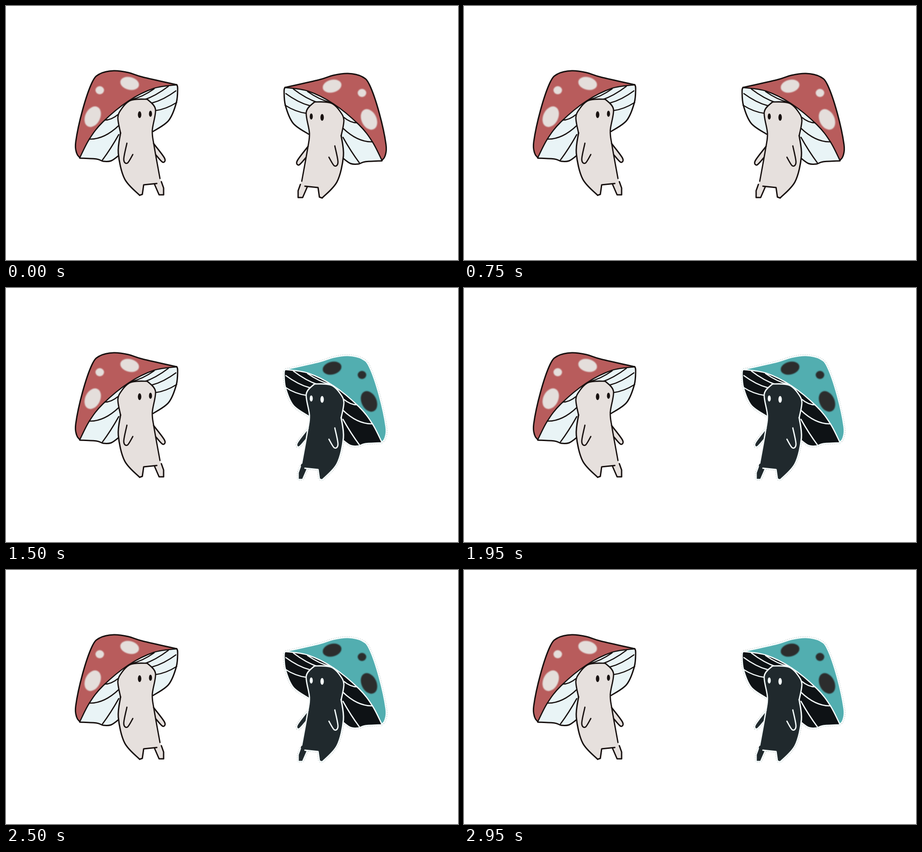
Write an HTML page with a canvas that moves like this. It is 998x561 px and loops after 3250 ms.

```html
<!DOCTYPE html>
<html lang="en">
<head>
<meta charset="utf-8">
<title>Two mushrooms</title>
<style>
html, body { margin: 0; width: 100%; height: 100%; overflow: hidden; background: #fff; }
canvas { display: block; }
</style>
</head>
<body>
<canvas id="stage" width="998" height="561"></canvas>
<script>
const ctx = document.getElementById('stage').getContext('2d');

const light = { cap: '#b85c5c', gill: '#e9f4f6', body: '#e6e0dd', spot: '#e4dedb', line: '#17100f' };
const dark = { cap: '#52aeb0', gill: '#0e1215', body: '#20292d', spot: '#2c2d2d', line: '#f5fcfc', fringe: '#879494' };

const curve = text => text.split(' ').map(p => p.split(',').map(Number));

// Splits a list of points into straight edges.
function edges(text) {
  const p = curve(text);
  return p.slice(1).map((end, i) => [p[i], end]);
}

// Joins the points of each curve with a smooth spline.
function shape(...curves) {
  const path = new Path2D();
  curves.forEach((c, k) => {
    path[k ? 'lineTo' : 'moveTo'](...c[0]);
    for (let i = 0; i < c.length - 1; i++) {
      const a = c[i - 1] || c[i], b = c[i], d = c[i + 1], e = c[i + 2] || d;
      path.bezierCurveTo(
        b[0] + (d[0] - a[0]) / 6, b[1] + (d[1] - a[1]) / 6,
        d[0] - (e[0] - b[0]) / 6, d[1] - (e[1] - b[1]) / 6, d[0], d[1]);
    }
  });
  return path;
}

// A gill line that sags below its chord.
function fold(x1, y1, x2, y2, sag) {
  const path = new Path2D();
  path.moveTo(x1, y1);
  path.quadraticCurveTo((x1 + x2) / 2, (y1 + y2) / 2 + sag * 2, x2, y2);
  return path;
}

const capTop = curve('163,335 156,325 154,300 169,230 190,169 207,150 238,143 270,147 302,157 377,174');
const rim = curve('377,174 326,182 270,210 214,256 184,294 163,335');
const hem = curve('163,336 200,338 215,343 232,342 248,331');
const gillEdge = curve('325,277 359,253 376,214 379,182 377,174');
const head = curve('253,281 247,246 256,226 272,210 290,206 312,206');
const back = curve('312,206 330,228 323,275 327,309 340,381');
const belly = curve('253,280 248,325 262,382 295,418');
const crotch = edges('295,418 301,416 304,395 333,392');
const leg = edges('343,388 348,402 348,417 338,417 328,394');
const nearArm = curve('267,303 260,339 268,347 280,328');
const farArm = curve('326,304 350,336 346,345 331,329');

const folds = [fold(184, 294, 249, 264, 8), fold(218, 252, 247, 240, 3), fold(213, 340, 249, 284, 2)];
for (let u = 0; u <= 1; u += 1 / 3) {
  folds.push(fold(
    276 + 54 * Math.sin(u * Math.PI / 2), 207 + 24 * u ** 3,
    327 + 116 * u - 66 * u * u, 183 - 40 * u + 70 * u * u, 3));
}

const capFill = shape(capTop, rim);
const gillFill = shape(rim, hem, gillEdge);
const armFill = shape(farArm);
const torsoFill = shape(head, back, ...leg, [[304, 395], [301, 416]], [...belly].reverse());
const outer = [shape(capTop), shape(hem), shape(gillEdge), shape(belly), shape(...crotch), shape(...leg), armFill];
const gillLines = [shape(rim), ...folds];
const bodyLines = [head, back, nearArm].map(c => shape(c));

function fill(path, color) {
  ctx.fillStyle = color;
  ctx.fill(path);
}

function stroke(paths, color, width) {
  ctx.strokeStyle = color;
  ctx.lineWidth = width;
  paths.forEach(p => ctx.stroke(p));
}

function oval(x, y, rx, ry, turn, color) {
  ctx.fillStyle = color;
  ctx.beginPath();
  ctx.ellipse(x, y, rx, ry, turn, 0, Math.PI * 2);
  ctx.fill();
}

function mushroom(look) {
  ctx.lineCap = 'butt';
  ctx.lineJoin = 'round';
  if (look.fringe) {
    ctx.setLineDash([1, 3]);
    stroke(outer, look.fringe, 4.8);
    ctx.setLineDash([]);
  }
  ctx.lineCap = 'round';

  fill(gillFill, look.gill);
  fill(capFill, look.cap);
  ctx.filter = 'blur(1.2px)';
  oval(207, 186, 9.5, 9, 0, look.spot);
  oval(273, 171, 21, 14, 0.25, look.spot);
  oval(191.5, 244.5, 16.5, 24, 0.45, look.spot);
  ctx.filter = 'none';
  stroke(gillLines, look.line, 2.6);

  fill(armFill, look.body);
  fill(torsoFill, look.body);
  stroke(outer, look.line, 3);
  stroke(bodyLines, look.line, 2.8);
  oval(295, 240, 3.8, 7.6, 0, look.line);
  oval(319, 238, 3.4, 6.8, 0, look.line);
}

function draw(leftDark, rightDark) {
  ctx.fillStyle = '#fff';
  ctx.fillRect(0, 0, 998, 561);
  mushroom(leftDark ? dark : light);
  ctx.save();
  ctx.translate(993, 6);
  ctx.scale(-1, 1);
  mushroom(rightDark ? dark : light);
  ctx.restore();
}

const within = (t, a, b) => t >= a && t < b;
let shown = '';

function tick() {
  const t = performance.now() % 3250;
  const left = within(t, 1250, 1500) || within(t, 2250, 2500);
  const right = t >= 1250 && !within(t, 2250, 2500);
  const key = `${left} ${right}`;
  if (key !== shown) {
    draw(left, right);
    shown = key;
  }
  requestAnimationFrame(tick);
}
tick();
</script>
</body>
</html>
```
